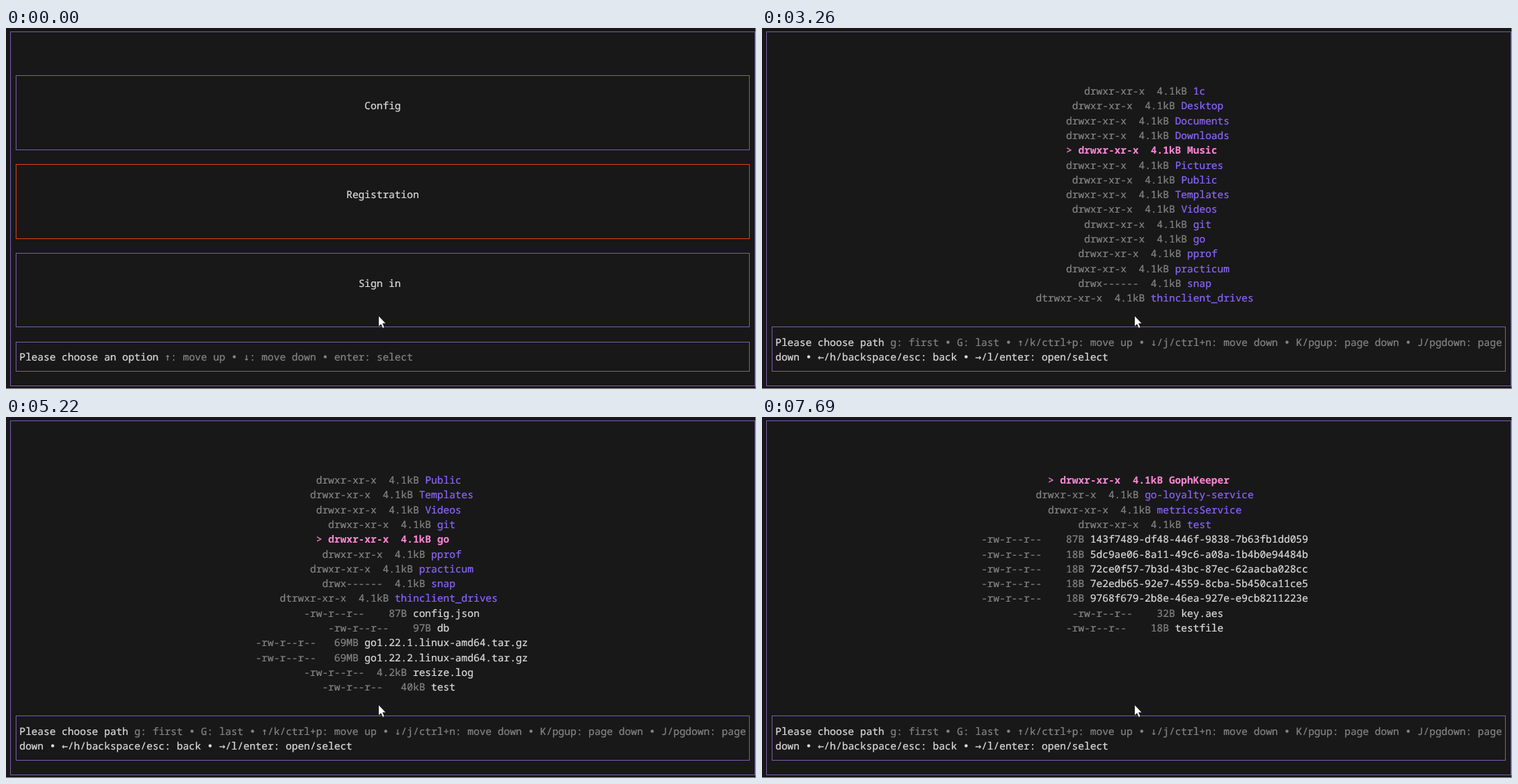
Recreate the animation shown at these times as an HTML page. Size 1078 by 520 pixels, loop 8000 ms.

```html
<!DOCTYPE html>
<html lang="en">
<head>
<meta charset="utf-8">
<title>Terminal file picker</title>
<style>
  html, body { margin: 0; width: 100%; height: 100%; overflow: hidden; background: #181818; }
  svg { display: block; width: 1078px; height: 520px; }
  text {
    font: 14.507px "Noto Sans Mono", "DejaVu Sans Mono", monospace;
    white-space: pre;
    text-rendering: geometricPrecision;
    fill: var(--ink);
    stroke: var(--ink);
    stroke-width: .22px;
  }
  .symbol { font-family: "DejaVu Sans Mono", monospace; }
  .light { --ink: #dcdcdc; }
  .dim { --ink: #848484; }
  .dir { --ink: #8c66ff; }
  .pink { --ink: #ff87d7; }
  .bold { font-weight: 700; stroke: none; }
  rect { fill: none; stroke: #785ea6; }
  rect.active { stroke: #e23e14; }
</style>
</head>
<body>
<svg viewBox="0 0 1078 520">
  <g id="screen"></g>
  <path d="M1077.5 0V519.5H0" fill="none" stroke="#a0a0a0"/>
  <path d="M535.5 414.5v15.6l3.5-3.3 2.5 5.6 2.5-1.1-2.5-5.5h4.6z" fill="#fff" stroke="#000" stroke-width=".6"/>
</svg>
<script>
const CELL_W = 8.704, CELL_H = 21.28, LEFT = 1.8, TOP = 5.14;
const COLS = 124, VISIBLE = 15;
const screen = document.getElementById('screen');

const lineX = col => Math.floor(LEFT + (col + 0.5) * CELL_W) + 0.5;
const lineY = row => Math.floor(TOP + row * CELL_H) + 0.5;

// Symbols get their own cell so another font cannot shift the line.
function put(col, row, str, cls) {
  const y = Math.round(TOP + row * CELL_H + 5.9);
  return str.split(/([↑↓←→•])/).map((part, i) => {
    const x = (LEFT + col * CELL_W).toFixed(2);
    col += part.length;
    return part.trim() && `<text x="${x}" y="${y}" class="${cls}${i % 2 ? ' symbol' : ''}">${part}</text>`;
  }).join('');
}

function box(col, top, bottom, cls = '') {
  const x = lineX(col), y = lineY(top);
  return `<rect class="${cls}" x="${x}" y="${y}" width="${lineX(COLS - 1 - col) - x}" height="${lineY(bottom) - y}"/>`;
}

const outer = (top = 0) => box(0, top, 24);

function buttons(labels, selected, first, size, gap) {
  return labels.map((label, i) => {
    const top = first + i * gap;
    const col = Math.floor((COLS - label.length) / 2);
    return box(1, top, top + size, i === selected ? 'active' : '') + put(col, top + 2, label, 'light');
  }).join('');
}

function help(title, keys, row = 22) {
  return box(1, row - 1, 23) + put(2, row, title, 'light') + put(3 + title.length, row, keys, 'dim');
}

const MOVE = '↑: move up • ↓: move down • enter: select';

const menu = selected => outer()
  + buttons(['Config', 'Registration', 'Sign in'], selected, 3, 5, 6)
  + help('Please choose an option', MOVE);

const config = selected => outer(-2)
  + buttons(['Path to secret key: /root/practicum/key.aes', 'Address to service: localhost:3388',
    'Create secret key', 'Save and close'], selected, 0, 4, 5)
  + help('Please configurate configuration', MOVE);

const dir = (name, perm = 'drwxr-xr-x') => ({ name, perm, size: '4.1kB', cls: 'dir' });
const file = (name, size) => ({ name, perm: '-rw-r--r--', size, cls: 'light' });
const dirs = names => names.split(' ').map(name => dir(name));

const home = [
  ...dirs('1c Desktop Documents Downloads Music Pictures Public Templates Videos git go pprof practicum'),
  dir('snap', 'drwx------'),
  dir('thinclient_drives', 'dtrwxr-xr-x'),
  file('config.json', '87B'),
  file('db', '97B'),
  file('go1.22.1.linux-amd64.tar.gz', '69MB'),
  file('go1.22.2.linux-amd64.tar.gz', '69MB'),
  file('resize.log', '4.2kB'),
  file('test', '40kB')
];

const practicum = [
  ...dirs('GophKeeper go-loyalty-service metricsService test'),
  file('143f7489-df48-446f-9838-7b63fb1dd059', '87B'),
  file('5dc9ae06-8a11-49c6-a08a-1b4b0e94484b', '18B'),
  file('72ce0f57-7b3d-43bc-87ec-62aacba028cc', '18B'),
  file('7e2edb65-92e7-4559-8cba-5b450ca11ce5', '18B'),
  file('9768f679-2b8e-46ea-927e-e9cb8211223e', '18B'),
  file('key.aes', '32B'),
  file('testfile', '18B')
];

function entry({ name, perm, size, cls }, row, active) {
  const info = perm + size.padStart(7) + ' ';
  const col = Math.ceil((COLS - 2 - info.length - name.length) / 2);
  if (active) return put(col, row, '>', 'pink') + put(col + 2, row, info + name, 'pink bold');
  return put(col + 2, row, perm, 'dim')
    + put(col + 2 + info.length - 1 - size.length, row, size, 'dim')
    + put(col + 2 + info.length, row, name, cls);
}

const picker = list => (selected, top = 0) => outer()
  + list.slice(top, top + VISIBLE).map((item, i) => entry(item, 4 + i, top + i === selected)).join('')
  + help('Please choose path', 'g: first • G: last • ↑/k/ctrl+p: move up • ↓/j/ctrl+n: move down'
    + ' • K/pgup: page down • J/pgdown: page', 21)
  + put(2, 22, 'down • ←/h/backspace/esc: back • →/l/enter: open/select', 'light');

const browse = picker(home), inside = picker(practicum);

// time in ms, view, selected item, first visible item
const STEPS = [
  [0, menu, 1], [120, menu, 0],
  [1090, config, 0],
  [2020, browse, 0], [2700, browse, 1],
  [3260, browse, 4], [3380, browse, 7], [3530, browse, 12],
  [3680, browse, 16, 2], [3800, browse, 20, 6],
  [4490, browse, 19, 6], [4950, browse, 18, 6],
  [5100, browse, 14, 6], [5220, browse, 10, 6], [5340, browse, 6, 6],
  [5490, browse, 2, 2], [5610, browse, 0],
  [6170, browse, 1],
  [6600, browse, 2], [6720, browse, 5], [6840, browse, 9],
  [6990, browse, 13], [7420, browse, 12],
  [7690, inside, 0]
];
const LOOP = 8000;

let shown, start;
function tick(now) {
  start ??= now;
  const t = (now - start) % LOOP;
  const step = STEPS.findLast(s => s[0] <= t) || STEPS[0];
  if (step !== shown) {
    shown = step;
    const [, view, selected, top] = step;
    screen.innerHTML = view(selected, top);
  }
  requestAnimationFrame(tick);
}
tick(performance.now());
</script>
</body>
</html>
```
